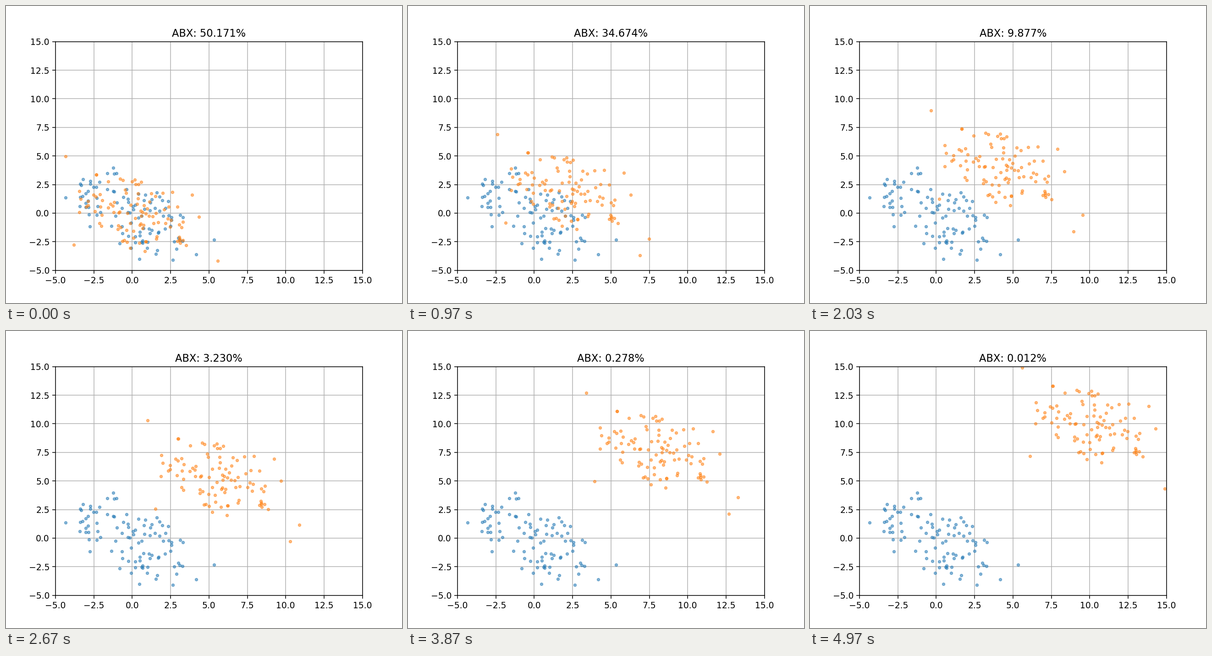
A matplotlib script that plays this animation: 864x648 px, repeating every 5 s.

```python
import numpy as np
import matplotlib.pyplot as plt
from matplotlib.animation import FuncAnimation

FRAMES = 150
LOOP_MS = 5000
SHIFT = 10
COUNT = 100

# A few far outliers give each cloud its outline.
BLUE_FAR = [(-4.34, 1.38), (-3.39, 2.56), (-1.25, 3.96), (-2.77, -1.18),
            (5.32, -2.31), (4.18, -3.59), (2.66, -4.07), (0.46, -3.99)]
ORANGE_FAR = [(-4.33, 4.98), (-3.81, -2.77), (-3.45, 0.09), (3.90, 1.61),
              (4.36, -0.34), (4.95, -5.61), (5.56, -4.17), (2.61, 1.83)]

# Error rate in percent, interpolated smoothly on a logit scale.
KEY_STEPS = np.array([0, 16, 43, 80, 103, 130, 149])
KEY_RATES = np.array([50.171, 45.461, 21.615, 3.230, 0.729, 0.085, 0.012])
LOGITS = np.log(KEY_RATES / (100 - KEY_RATES))
CURVE = np.polyfit(KEY_STEPS / FRAMES, LOGITS, len(KEY_STEPS) - 1)


def error_rate(t):
    return 100 / (1 + np.exp(-np.polyval(CURVE, t)))


def cloud(far, center, rng, major=4.5, minor=2.6):
    """Fill an ellipse tilted along (1, -1), denser in the middle."""
    n = COUNT - len(far)
    angle = rng.uniform(0, 2 * np.pi, n)
    radius = rng.uniform(0, 1, n) ** 0.6
    u = major * radius * np.cos(angle)
    v = minor * radius * np.sin(angle)
    core = np.column_stack([v + u, v - u]) / np.sqrt(2)
    return np.vstack([far, core + center])


rng = np.random.default_rng(7)
blue = cloud(BLUE_FAR, (0, 0), rng)
orange = cloud(ORANGE_FAR, (0.1, 0), rng)

fig, ax = plt.subplots(figsize=(6.4, 4.8), dpi=135)
ax.set(xlim=(-5, 15), ylim=(-5, 15))
ax.grid(True)
ax.plot(*blue.T, ".", color="C0", alpha=0.5)
moving, = ax.plot([], [], ".", color="C1", alpha=0.5)
title = ax.set_title("")


def draw(i):
    t = i / FRAMES
    moving.set_data(*(orange + SHIFT * t).T)
    title.set_text(f"ABX: {error_rate(t):.3f}%")
    return moving, title


anim = FuncAnimation(fig, draw, frames=FRAMES, init_func=lambda: draw(0),
                     interval=LOOP_MS / FRAMES, repeat=True, repeat_delay=0)
plt.show()
```
